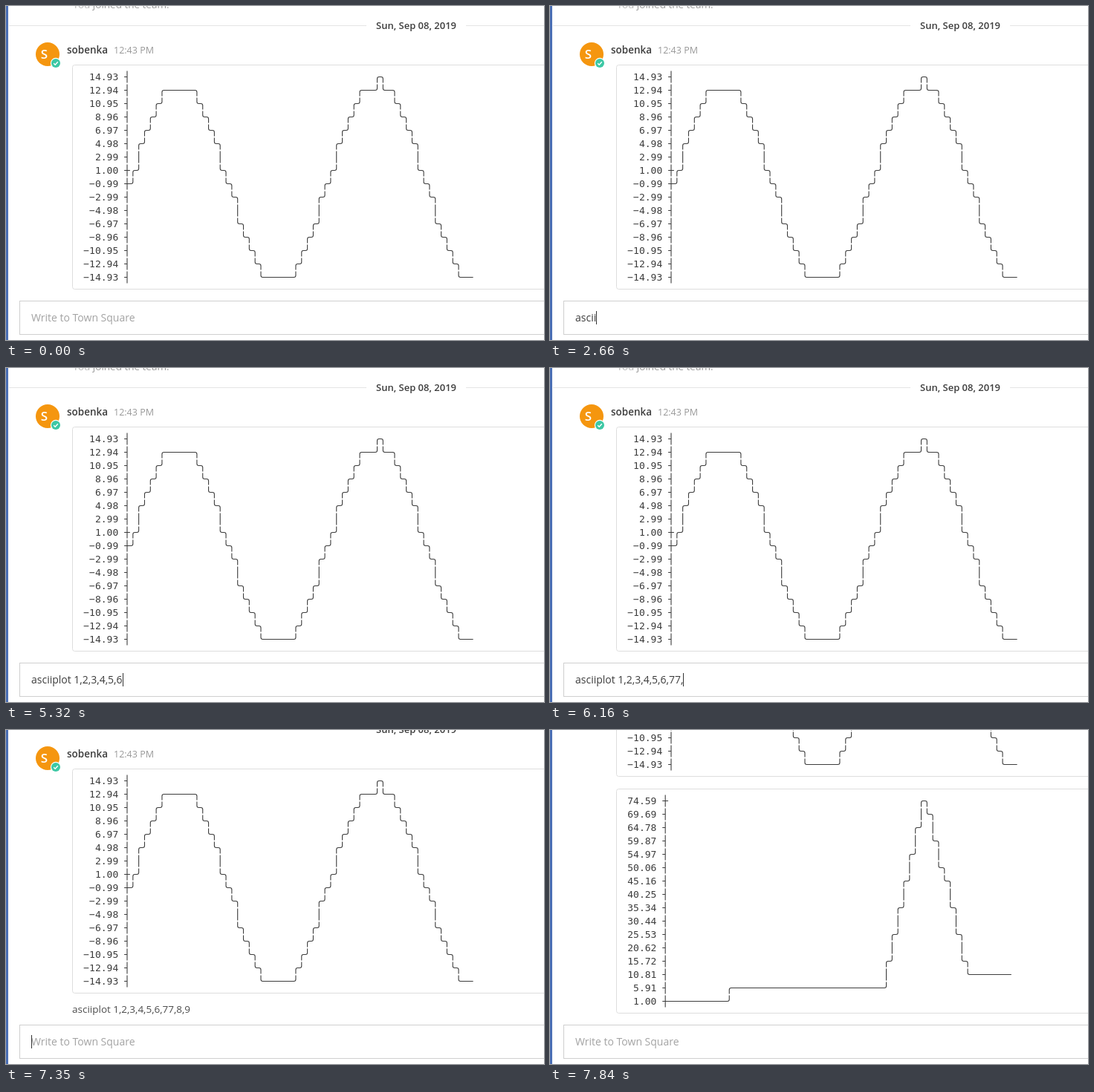
An HTML page that plays this animation: 724 by 450 pixels, repeating every 8 s.

```html
<!DOCTYPE html>
<html lang="en">
<head>
<meta charset="utf-8">
<title>Chat plot</title>
<style>
  html, body { margin: 0; width: 100%; height: 100%; overflow: hidden; background: #fff; }
  svg { display: block; }
  text { font: 13.5px "Open Sans", sans-serif; fill: #3d3d3d; white-space: pre; }
  .semi { font-weight: 600; }
  .code { font: 13px "DejaVu Sans Mono", monospace; text-anchor: end; }
  .frame { fill: #fff; stroke: #dedede; }
  .plot { fill: none; stroke: #3d3d3d; stroke-width: 1.1; }
  .field { font-size: 14px; }
</style>
</head>
<body>
<svg width="724" height="450" viewBox="0 0 724 450">
  <g id="feed">
    <text x="90" y="3" style="fill:#999"><tspan fill="#b8b8b8">You</tspan> joined the team.</text>
    <path d="M4 26.5H485M619 26.5H724" stroke="#e4e4e4"/>
    <text class="semi" x="552" y="31" text-anchor="middle" style="font-size:13px">Sun, Sep 08, 2019</text>
    <circle cx="56" cy="65" r="16" fill="#f5960f"/>
    <text class="semi" x="51.5" y="71" text-anchor="middle" style="font-size:17px;fill:#fff">S</text>
    <circle cx="67" cy="77" r="7.2" fill="#fff"/>
    <circle cx="67" cy="77" r="6" fill="#3dc8a5"/>
    <path d="M64.2 77.2l2 2 3.6-4" fill="none" stroke="#fff" stroke-width="1.4"/>
    <text class="semi" x="82" y="64">sobenka</text>
    <text x="145" y="64" style="font-size:12.5px;fill:#999">12:43 PM</text>
    <g id="wave"></g>
    <text id="message" x="89" y="408" style="fill:#4d4d4d"></text>
    <g id="peak" transform="translate(0 319)"></g>
  </g>
  <rect width="3" height="450" fill="#4a6fb5"/>
  <rect x="18.5" y="397.5" width="720" height="45" fill="#fff" stroke="#cfcfcf"/>
  <text id="placeholder" class="field" x="34" y="425" style="fill:#a3a3a3">Write to Town Square</text>
  <text id="typed" class="field" x="34" y="425"></text>
  <rect id="caret" y="411" width="1" height="18" fill="#333"/>
</svg>
<script>
const LOOP = 8000, SENT = 7350, REPLIED = 7490;
const COMMAND = 'asciiplot 1,2,3,4,5,6,77,8,9';
const CELL = 7.826, LINE = 18, LEFT = 104.3, TOP = 95.5;
const byId = id => document.getElementById(id);
const repeat = (value, count) => Array(count).fill(value);
const rowY = row => TOP + LINE * row;

// Box-drawing strokes: each line of text leaves a small gap below its verticals.
function plotPath(rows, axisX, zeroRow) {
  const half = CELL / 2, reach = 8, r = 2.5;
  let d = '';
  for (let row = 0; row < 16; row++) {
    const y = rowY(row), cross = row === zeroRow || row === rows[0];
    d += `M${axisX} ${y - reach}v${2 * reach}M${axisX - half} ${y}h${cross ? CELL : half}`;
  }
  for (let i = 1; i < rows.length; i++) {
    const x = axisX + i * CELL, from = rows[i - 1], to = rows[i];
    const y0 = rowY(from), y1 = rowY(to), dir = Math.sign(to - from);
    d += `M${x - half} ${y0}`;
    if (!dir) { d += `h${CELL}`; continue; }
    d += `H${x - r}q${r} 0 ${r} ${r * dir}V${y0 + reach * dir}`;
    for (let row = from + dir; row !== to; row += dir)
      d += `M${x} ${rowY(row) - reach}v${2 * reach}`;
    d += `M${x} ${y1 - reach * dir}V${y1 - r * dir}q0 ${r * dir} ${r} ${r * dir}H${x + half}`;
  }
  return d;
}

function drawChart(id, { rows, max, step, labelWidth, zeroRow }) {
  const labelEnd = LEFT + labelWidth * CELL;
  const labels = repeat(0, 16).map((_, row) =>
    `<text class="code" x="${labelEnd}" y="${rowY(row) + 4}">${
      (max - step * row).toFixed(2).replace('-', '−')}</text>`);
  byId(id).innerHTML = `<rect class="frame" x="89.5" y="79.5" width="650" height="302" rx="3"/>
    ${labels.join('')}<path class="plot" d="${plotPath(rows, labelEnd + 1.5 * CELL, zeroRow)}"/>`;
}

const fall = [2, 3, 4, 5, 7, 8, 9, 11, 12, 13, 14, 15];
const rise = [...fall.slice(0, -1).reverse(), 1];
drawChart('wave', {
  rows: [8, ...rise.slice(6), ...repeat(1, 5), ...fall, ...repeat(15, 5), ...rise,
    1, 1, 0, 1, 1, ...fall, 15, 15],
  max: 14.9335, step: 1.991, labelWidth: 6, zeroRow: 7
});
drawChart('peak', {
  rows: [...repeat(15, 11), ...repeat(14, 27), 12, 10, 8, 6, 4, 2, 0, 1, 3, 5, 6, 8, 10, 12,
    ...repeat(13, 8)],
  max: 74.593, step: 4.9062, labelWidth: 5, zeroRow: 0
});
byId('message').textContent = COMMAND;

// Bursts of typing: [start, interval, characters]
const bursts = [[2100, 140, 5], [2870, 210, 2], [3360, 154, 6], [4340, 140, 9], [5670, 168, 6]];
const keyTimes = bursts.flatMap(([start, gap, count]) =>
  repeat(0, count).map((_, i) => start + i * gap));
const caretOn = [[840, 1330], [1890, 7000], [SENT, 7840]];

const show = (id, visible) => byId(id).setAttribute('visibility', visible ? 'visible' : 'hidden');

function render(now) {
  const t = now % LOOP, sent = t >= SENT, replied = t >= REPLIED;
  const text = sent ? '' : COMMAND.slice(0, keyTimes.filter(k => k <= t).length);
  const typed = byId('typed');
  typed.textContent = text;
  byId('feed').setAttribute('transform', `translate(0 ${replied ? -319 : sent ? -27 : 0})`);
  show('message', sent && !replied);
  show('peak', replied);
  show('placeholder', !text);
  show('caret', caretOn.some(([on, off]) => t >= on && t < off));
  byId('caret').setAttribute('x', Math.round(34 + (text ? typed.getComputedTextLength() : 0)));
  requestAnimationFrame(render);
}
requestAnimationFrame(render);
</script>
</body>
</html>
```
